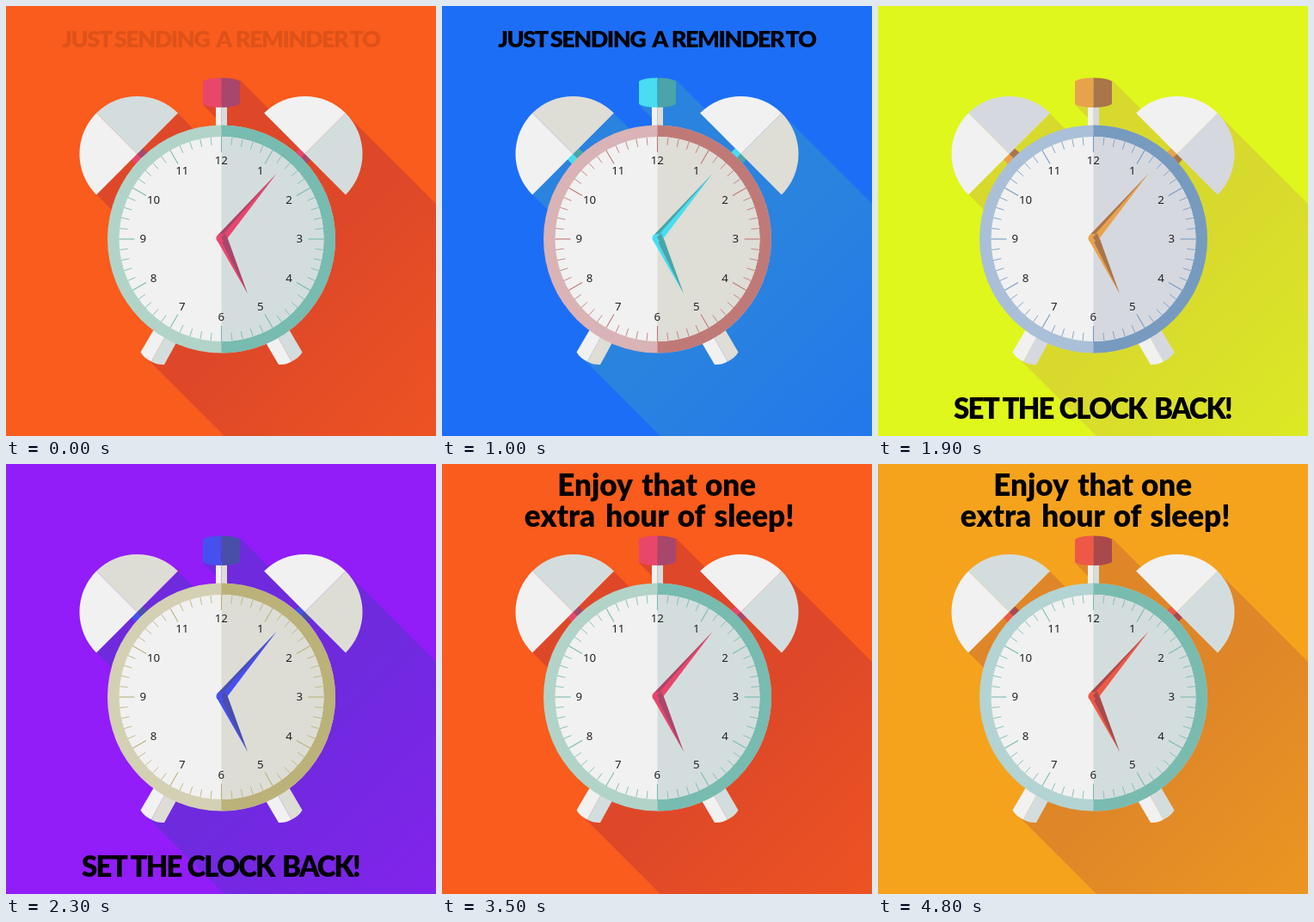
Write an HTML page that moves like this. It is 500 px wide and 500 px high and loops after 4900 ms.

```html
<!DOCTYPE html>
<html lang="en">
<head>
<meta charset="utf-8">
<title>Clock reminder</title>
<style>
  html, body { margin: 0; width: 100%; height: 100%; overflow: hidden; }
  svg { display: block; width: 100vw; height: 100vh; background: var(--bg); }
  .light { fill: #f1f1f1; }
  .shade { fill: var(--shade); }
  .rim { fill: var(--rim); }
  .rim-dark { fill: var(--rimDark); }
  .accent { fill: var(--accent); }
  .accent-dark { fill: var(--accentDark); }
  .tick { stroke: var(--rimDark); stroke-width: .8; }
  .tick.hour { stroke-width: 1.1; }
  stop { stop-color: var(--shadow); }
  text { text-anchor: middle; }
  .num { font: 13.3px "Noto Sans", "Open Sans", sans-serif; fill: #222; }
  .line { font-family: Lato, sans-serif; font-weight: 900; fill: #000; }
  .caps { letter-spacing: -.055em; }
</style>
</head>
<body>
<svg id="stage" viewBox="0 0 500 500">
  <defs>
    <linearGradient id="fade" gradientUnits="userSpaceOnUse" x1="250" y1="250" x2="500" y2="500">
      <stop offset="0"/>
      <stop offset=".3"/>
      <stop offset="1" stop-opacity=".45"/>
    </linearGradient>
  </defs>

  <g fill="url(#fade)">
    <path d="M395 125L700 430V946L157 403L250 271Z"/>
    <path d="M200 125L300 225L205 319L105 219Z"/>
    <path d="M272 86L362 176L319 205L229 115Z"/>
  </g>

  <!-- feet -->
  <path class="light" d="M172 376L185 384L169 413.500Q160 409 156.500 402.500Z"/>
  <path class="shade" d="M185 384L198 391.500L184 417Q176 417.500 169 413.500Z"/>
  <path class="light" d="M302 391.500L315.500 384L332 413.500Q325 417.500 317 417Z"/>
  <path class="shade" d="M315.500 384L329 376L344.500 402.500Q341 409 332 413.500Z"/>

  <!-- bells -->
  <path class="accent" d="M146 178.500L152.500 172L162 181.500L155 188Z"/>
  <path class="accent-dark" d="M152.500 172L159 165.500L169 175L162 181.500Z"/>
  <path class="accent" d="M347.500 172L341 165.500L331 175L338 181.500Z"/>
  <path class="accent-dark" d="M354 178.500L347.500 172L338 181.500L345 188Z"/>
  <path class="light" d="M152.500 172L105.100 219.400A67 67 0 0 1 105.100 124.600Z"/>
  <path class="shade" d="M152.500 172L105.100 124.600A67 67 0 0 1 199.900 124.600Z"/>
  <path class="light" d="M347.500 172L300.100 124.600A67 67 0 0 1 394.900 124.600Z"/>
  <path class="shade" d="M347.500 172L394.900 124.600A67 67 0 0 1 394.900 219.400Z"/>

  <!-- button -->
  <path class="light" d="M244 115H250.500V142H244Z"/>
  <path class="shade" d="M250.500 115H257V142H250.500Z"/>
  <path class="accent" d="M250.500 83.500Q235 83.500 229 87.500V114Q235 118 250.500 118Z"/>
  <path class="accent-dark" d="M250.500 83.500Q266 83.500 272 87.500V114Q266 118 250.500 118Z"/>

  <!-- body -->
  <circle class="rim" cx="250.500" cy="271" r="132.500"/>
  <path class="rim-dark" d="M250.500 138.500A132.500 132.500 0 0 1 250.500 403.500Z"/>
  <circle class="light" cx="250.500" cy="271" r="119"/>
  <path class="shade" d="M250.500 152A119 119 0 0 1 250.500 390Z"/>
  <g id="dial"></g>

  <!-- hands -->
  <path class="accent" d="M244.500 271L281 334.500L251 268Z"/>
  <path class="accent-dark" d="M249 270L281 334.500L257 268Z"/>
  <path class="accent-dark" d="M246.500 266L314.500 195L253 268Z"/>
  <path class="accent" d="M251 267L314.500 195L256.500 271.500Z"/>
  <circle class="accent" cx="249.500" cy="270" r="5"/>
  <path class="accent-dark" d="M250 269L255 264L257 270L254 275Z"/>

  <g id="captions"></g>
</svg>

<script>
const SVG = "http://www.w3.org/2000/svg";
const STEP = 100, LOOP = 4900;
const stage = document.getElementById("stage");

function add(parent, tag, attrs, text = "") {
  const node = document.createElementNS(SVG, tag);
  for (const key in attrs) node.setAttribute(key, attrs[key]);
  node.textContent = text;
  parent.append(node);
  return node;
}

// Dial: sixty ticks and twelve numerals
const dial = document.getElementById("dial");
for (let i = 0; i < 60; i++) {
  const hour = i % 5 === 0;
  add(dial, "line", {
    class: hour ? "tick hour" : "tick",
    x1: 250.5, x2: 250.5, y1: 152, y2: hour ? 170 : 161.5,
    transform: `rotate(${i * 6} 250.5 271)`
  });
}
for (let h = 1; h <= 12; h++) {
  const a = h * Math.PI / 6;
  add(dial, "text", {
    class: "num", x: 250.3 + 91 * Math.sin(a), y: 275 - 91 * Math.cos(a)
  }, h);
}

// Captions: words are placed by their centres
const captions = [
  { start: 0, end: 1500, style: "caps", size: 27, words: [
    ["JUST", 94, 48], ["SENDING", 181, 48], ["A", 253, 48],
    ["REMINDER", 332, 48], ["TO", 417, 48]] },
  { start: 1500, end: 3100, style: "caps", size: 33, words: [
    ["SET", 114, 480], ["THE", 174, 480], ["CLOCK", 261, 480], ["BACK!", 366, 480]] },
  { start: 3100, end: LOOP, style: "lower", size: 35, words: [
    ["Enjoy", 178, 37], ["that", 264.5, 37], ["one", 335.5, 37],
    ["extra", 137, 73], ["hour", 227, 73], ["of", 290, 73], ["sleep!", 363, 73]] }
];
for (const cap of captions) {
  cap.node = add(document.getElementById("captions"), "g", {
    class: "line " + cap.style, style: `font-size:${cap.size}px`
  });
  for (const [word, x, y] of cap.words) add(cap.node, "text", { x, y }, word);
}

const keys = ["bg", "shadow", "rim", "rimDark", "shade", "accent", "accentDark"];
const palettes = [
  "#f95c1c #de4829 #b2d4c8 #78bbb0 #d4dddd #e9466c #a9466b",
  "#f61c9c #d82abb #bdd4b3 #8dbb7a #d9ddd5 #d546ee #9949a9",
  "#921df8 #6f2ade #d4d0b3 #bbb27a #ddddd5 #4650ee #494fa9",
  "#1d6ef6 #2a83de #d9b3b5 #bf7a78 #deddd6 #48ddf0 #49a5a9",
  "#1df571 #2add59 #cab3d8 #a47abf #dbd5df #66ee46 #5ca949",
  "#dff71c #d8d92d #a9c0d8 #779bbf #d6d8e0 #e9a24c #a9754b",
  "#f5a31d #df8628 #b3d4d2 #7abbb0 #d4dddd #ee5846 #a9494b"
].map(row => row.split(" "));

function draw(now) {
  const t = Math.floor((now % LOOP) / STEP) * STEP;
  const colours = palettes[(t / STEP) % palettes.length];
  keys.forEach((key, i) => stage.style.setProperty("--" + key, colours[i]));
  for (const { node, start, end } of captions) {
    const shown = t >= start && t < end;
    node.style.opacity = shown ? Math.min(1, .1 + (t - start) / 333) : 0;
  }
}

const origin = performance.now();
function tick() {
  draw(performance.now() - origin);
  requestAnimationFrame(tick);
}
tick();
</script>
</body>
</html>
```
